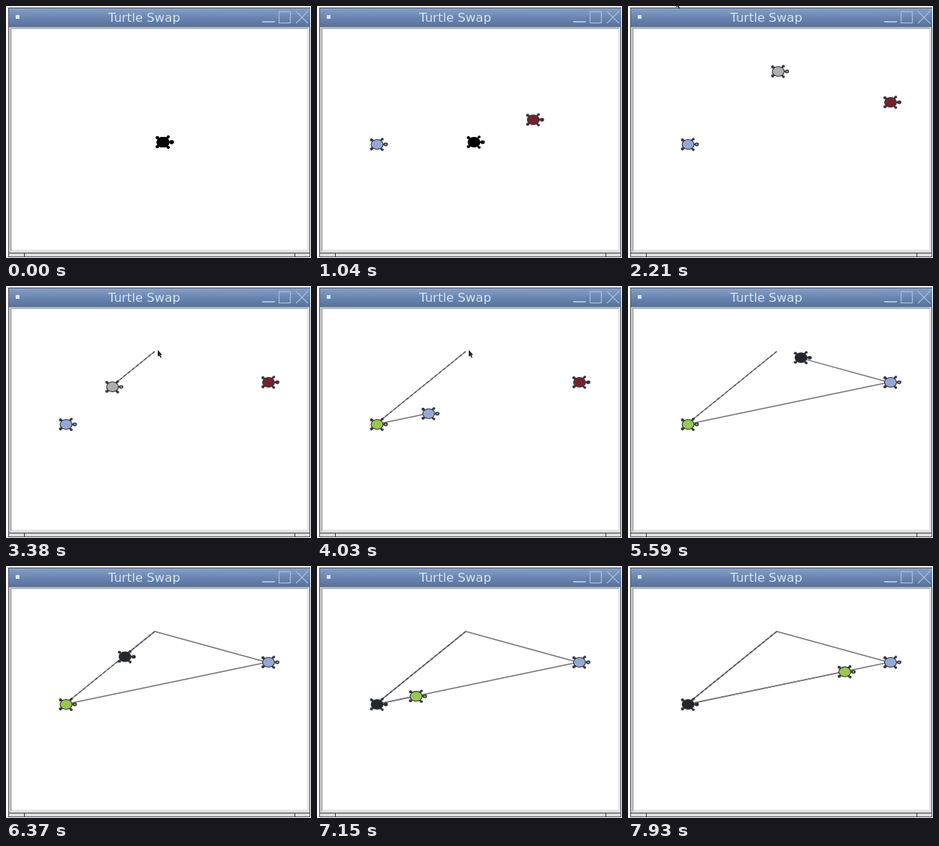
An HTML page with a canvas that plays this animation: 406x335 px, repeating every 8 s.

```html
<!DOCTYPE html>
<html lang="en">
<head>
<meta charset="utf-8">
<title>Turtle Swap</title>
<style>
html, body { margin: 0; width: 406px; height: 335px; overflow: hidden; background: #fff; }
canvas { display: block; }
</style>
</head>
<body>
<canvas width="406" height="335"></canvas>
<script>
const c = document.querySelector('canvas').getContext('2d');
const LOOP = 8000, STEP = 130;
const HOME = [209, 181], LEFT = [80, 184], RIGHT = [349.5, 128], TOP = [200, 87];
const BLACK = '#23262e', GREY = '#aeaeae', BLUE = '#92a9d8', RED = '#78202a', GREEN = '#98c84c';

// Each move: start, end, from, to, and whether the pen is down.
const turtles = [
  { moves: [[0, 630, HOME, LEFT], [3689, 5027, LEFT, RIGHT, true]],
    colors: [[0, '#000'], [130, BLUE]] },
  { moves: [[630, 1360, HOME, RIGHT], [5020, 5735, RIGHT, TOP, true], [6110, 6860, TOP, LEFT, true]],
    colors: [[0, '#000'], [650, RED], [5020, BLACK]] },
  { moves: [[1360, 1820, HOME, TOP], [3016, 3766, TOP, LEFT, true], [6891, 8233, LEFT, RIGHT, true]],
    colors: [[0, '#000'], [1400, GREY], [3766, GREEN]] }
];

const clamp = x => Math.max(0, Math.min(1, x));
const mix = (a, b, k) => [a[0] + (b[0] - a[0]) * k, a[1] + (b[1] - a[1]) * k];
const along = ([start, end, a, b], t) => mix(a, b, clamp((t - start) / (end - start)));
const latest = (list, t) => list.filter(e => e[0] <= t).pop() || list[0];

function rect(color, x, y, w, h) {
  c.fillStyle = color;
  c.fillRect(x, y, w, h);
}

function line(color, width, points) {
  c.strokeStyle = color;
  c.lineWidth = width;
  c.beginPath();
  points.forEach(p => c.lineTo(...p));
  c.stroke();
}

function oval(x, y, rx, ry, color) {
  c.beginPath();
  c.ellipse(x, y, rx, ry, 0, 0, 7);
  c.fillStyle = color;
  c.fill();
}

function drawWindow() {
  rect('#fff', 0, 0, 406, 335);
  rect('#4a505a', 3, 2, 402, 332);
  rect('#d2d2d2', 4, 28, 400, 305);
  const bar = c.createLinearGradient(0, 3, 0, 28);
  bar.addColorStop(0, '#86a0c8');
  bar.addColorStop(0.5, '#6985b0');
  bar.addColorStop(1, '#54719c');
  rect(bar, 4, 3, 401, 25);
  rect('#989898', 6, 29, 396, 297);
  rect('#e2e2e2', 7, 30, 396, 297);
  rect('#fff', 8, 31, 393, 293);
  rect('#4a4a4a', 4, 328, 400, 1);
  rect('#dcdcdc', 4, 329, 400, 4);
  rect('#343434', 24, 328, 1, 6);
  rect('#343434', 384, 328, 1, 6);

  c.font = '16.5px "DejaVu Sans", sans-serif';
  c.textAlign = 'center';
  c.fillStyle = '#d8e1f0';
  c.fillText('Turtle Swap', 184, 21);
  rect('#dce4f0', 13, 12, 5, 5);
  const icon = '#aabdda';
  rect(icon, 341, 20, 17, 2);
  c.strokeStyle = icon;
  c.lineWidth = 1.2;
  c.strokeRect(363.5, 7.5, 15, 15);
  line(icon, 1.1, [[386, 7], [402, 23]]);
  line(icon, 1.1, [[402, 7], [386, 23]]);
}

function drawTurtle([x, y], color) {
  const edge = color === '#000' ? color : '#34373f';
  c.save();
  c.translate(x, y);
  for (const s of [-1, 1]) {
    line(edge, 2.4, [[0, 0], [-7, 6 * s]]);
    line(edge, 2.4, [[0, 0], [6.5, 7 * s]]);
    oval(-7.5, 6 * s, 2.1, 1.9, edge);
    oval(7, 7 * s, 1.8, 1.8, edge);
  }
  line(edge, 2, [[0, 0], [11, 0]]);
  oval(11.5, 0, 2.9, 2.4, edge);
  oval(11.5, 0, 1.3, 1, color);
  oval(0, 0, 8.5, 7.1, edge);
  oval(0, 0, 7.4, 6, color);
  c.restore();
}

function drawCursor(t) {
  if (t < 2210 || t >= 5010) return;
  const [x, y] = along([2210, 2990, [64, -7], [202, 85]], t);
  const shape = [[0, 0], [0, 9], [2, 7.2], [3.5, 10.6], [5, 10], [3.6, 6.7], [6, 6.4]];
  c.fillStyle = '#222';
  c.beginPath();
  shape.forEach(([dx, dy]) => c.lineTo(x + dx, y + dy));
  c.fill();
}

function drawTrail(move, t) {
  const path = [move[2], along(move, t)].map(([x, y]) => [x - 2, y]);
  line('#74747a', 1.4, path);
  if (move[2] !== TOP) return;
  c.setLineDash([4, 3]);
  line('#55555c', 1.4, path);
  c.setLineDash([]);
}

function draw(t) {
  drawWindow();
  for (const { moves } of turtles)
    for (const move of moves)
      if (move[4] && t > move[0]) drawTrail(move, t);
  for (const { moves, colors } of turtles)
    drawTurtle(along(latest(moves, t), t), latest(colors, t)[1]);
  drawCursor(t);
}

const begin = performance.now();
function frame() {
  const t = (performance.now() - begin) % LOOP;
  draw(Math.floor(t / STEP) * STEP);
  requestAnimationFrame(frame);
}
frame();
</script>
</body>
</html>
```
